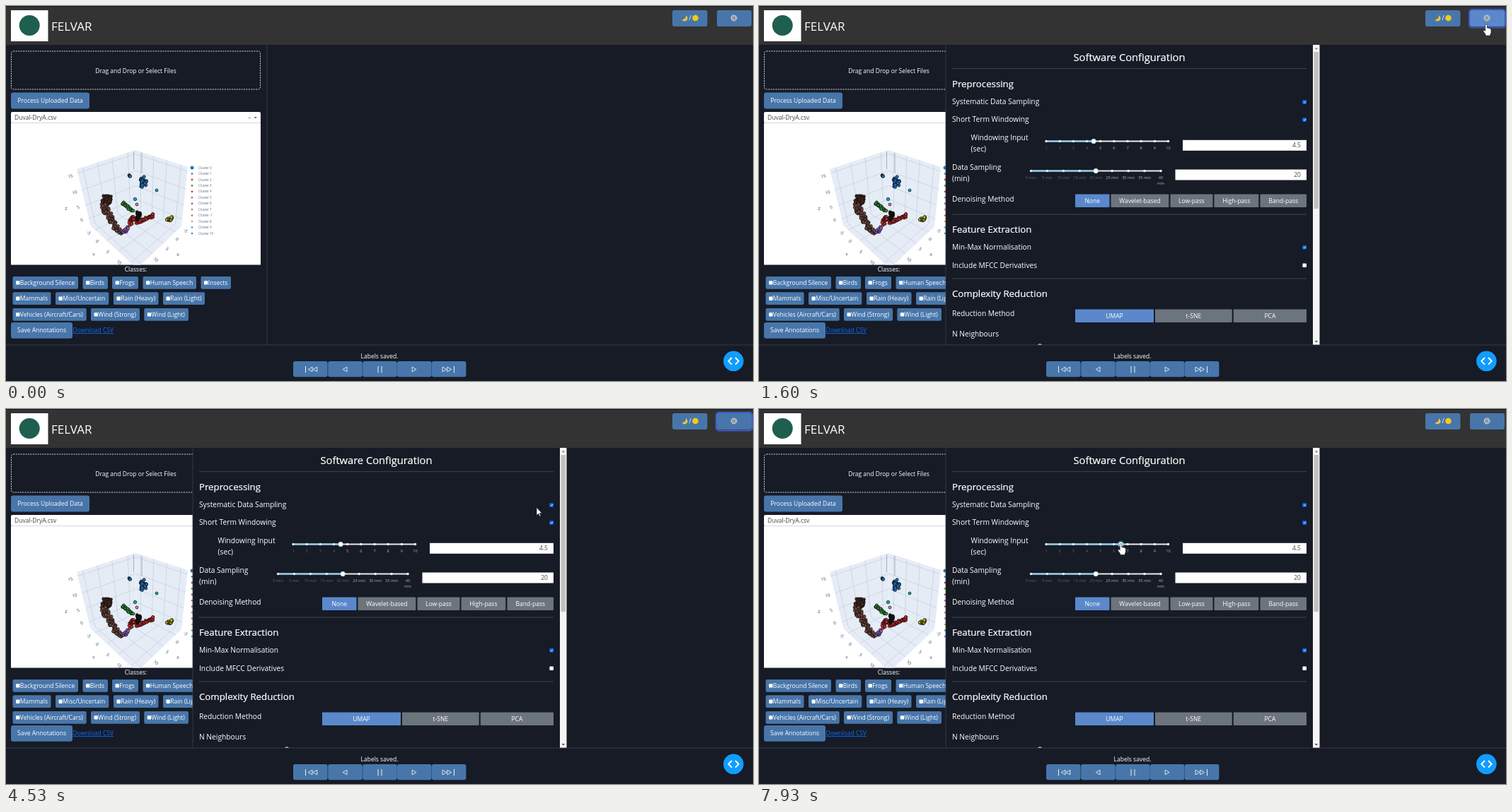
These frames come from a looping animation (1056 by 531 pixels, 8 s). An HTML page:

```html
<!DOCTYPE html>
<html lang="en">
<head>
<meta charset="utf-8">
<title>Annotation tool</title>
<style>
html, body { margin: 0; width: 100%; height: 100%; overflow: hidden; background: #161b26; }
svg { display: block; width: 100vw; height: 100vh; font-family: "Open Sans", "Noto Sans", sans-serif; }
text { white-space: pre; }
.head { stroke: #fff; stroke-width: .22; }
</style>
</head>
<body>
<svg id="stage" viewBox="0 0 1056 531"></svg>
<script>
const BG = '#161b26', BTN = '#4876aa', LIT = '#5a88cb', GREY = '#6c757d', LINE = '#3a3f49';
const BASE = 8.53, LABEL = 10.24, HEAD = 13.25;
const stage = document.getElementById('stage');

let seed = 7;
const rnd = () => (seed = seed * 16807 % 2147483647) / 2147483647;
const mix = (a, b, t) => a + (b - a) * t;

// Shape helpers; text is placed by the middle of its capitals.
const text = (x, cy, s, size = BASE, anchor = 'start', fill = '#fff', more = '') =>
  `<text x="${x}" y="${(cy + size * .357).toFixed(2)}" font-size="${size}" text-anchor="${anchor}" fill="${fill}" ${more}>${s}</text>`;
const rect = (x, y, w, h, fill, r = 0, more = '') =>
  `<rect x="${x}" y="${y}" width="${w}" height="${h}" rx="${r}" fill="${fill}" ${more}/>`;
const circle = (x, y, r, fill, more = '') =>
  `<circle cx="${x.toFixed(2)}" cy="${y.toFixed(2)}" r="${r}" fill="${fill}" ${more}/>`;
const path = (d, stroke, w = 1, fill = 'none') =>
  `<path d="${d}" stroke="${stroke}" stroke-width="${w}" fill="${fill}"/>`;
const button = (x0, x1, y, h, label, fill = BTN, r = 3) =>
  rect(x0, y, x1 - x0, h, fill, r) + text((x0 + x1) / 2, y + h / 2, label, BASE, 'middle');

function header() {
  return rect(0, 0, 1056, 1, '#101a2b') + rect(0, 1, 1056, 54, '#333') +
    rect(7, 6, 52.5, 44, '#fff') + circle(33.2, 27.5, 14.5, '#1f5f50') +
    text(64, 28.5, 'FELVAR', 17) +
    rect(942, 6, 49.5, 23, BTN, 3) +
    path('M961 13.2A4.3 4.3 0 1 1 955.6 19.4A5.2 5.2 0 0 0 961 13.2Z', 'none', 0, '#f3c53a') +
    text(967, 17.3, '/', BASE, 'middle') + circle(974.5, 17, 4.3, '#f4cb16') +
    `<rect id="ring" x="1004" y="5" width="51" height="25.5" rx="4" fill="none" stroke="#3f5ed2" stroke-width="2"/>` +
    `<rect id="gear" x="1005" y="6" width="49" height="23" rx="3"/>` +
    circle(1029, 17, 3.9, '#54606e', 'stroke="#d9dde2" stroke-width="1.1" stroke-dasharray="1.9 .55"') +
    circle(1029, 17, 2.7, 'none', 'stroke="#e3e6ea" stroke-width=".9"') +
    circle(1029, 17, 1.1, '#e3e6ea');
}

function scatter() {
  const dot = (x, y, c, r = 2.1) => circle(x, y, r, c, 'stroke="#111" stroke-width=".75"');
  // Points strewn along a polyline
  const trail = (pts, n, spread, c, r) => {
    let s = '';
    for (let i = 0; i < n; i++) {
      const u = (i + rnd()) / n * (pts.length - 1), k = Math.min(pts.length - 2, Math.floor(u));
      const [a, b] = [pts[k], pts[k + 1]];
      s += dot(mix(a[0], b[0], u - k) + (rnd() - .5) * 2 * spread, mix(a[1], b[1], u - k) + (rnd() - .5) * 2 * spread, c, r);
    }
    return s;
  };
  const top = [183, 204], left = [100, 231], right = [257, 228];
  const mid = [184, 283], lowL = [119.5, 311], lowR = [248, 312], front = [185, 372];
  const at = (a, b, t) => `${mix(a[0], b[0], t)} ${mix(a[1], b[1], t)}`;
  const face = (...p) => `<path d="M${p.map(q => q.join(' ')).join('L')}Z" fill="#e5ecf6"/>`;
  const rule = (a, b, c, d, t) => path(`M${at(a, b, t)}L${at(c, d, t)}`, '#bcc8d6', .6);
  let s = face(left, top, mid, lowL) + face(top, right, lowR, mid) + face(lowL, mid, lowR, front);
  for (const t of [.07, .37, .64, .88]) s += rule(left, lowL, top, mid, t) + rule(top, mid, right, lowR, t);
  for (const t of [.1, .35, .6, .87]) {
    s += rule(left, top, lowL, mid, t) + rule(top, right, mid, lowR, t);
    s += rule(lowL, front, mid, lowR, t) + rule(lowL, mid, front, lowR, t);
  }
  s += path('M180.5 206V231M192 208V236', '#7d8896', .6);
  const tick = (x, y, v, turn) => text(x, y, v, 6, 'middle', '#2a3f5f', `transform="rotate(${turn} ${x} ${y})"`);
  [['15', 91, 241], ['10', 97, 264], ['5', 102, 285], ['0', 107, 303]].forEach(([v, x, y]) => s += tick(x, y, v, -18));
  [['-5', 117, 321], ['0', 129, 333], ['5', 144, 348], ['10', 160, 363]].forEach(([v, x, y]) => s += tick(x, y, v, 42));
  [['10', 212, 359], ['5', 228, 344], ['0', 242, 330], ['-5', 254, 318]].forEach(([v, x, y]) => s += tick(x, y, v, 42));
  s += tick(85, 287, 'Z', 0) + tick(124, 352, 'Y', 0) + tick(243, 352, 'X', 0);

  s += trail([[173.5, 240], [175.5, 241]], 4, .8, '#1f77b4') +
    trail([[193.5, 245], [195, 253]], 40, 4, '#1f6fc0') +
    dot(213, 261, '#17a6c4', 2) + dot(182.5, 273.5, '#17a6c4', 2.2) + dot(185, 281, '#c98a96', 2) +
    trail([[137, 272], [147, 271], [139, 279], [147, 275]], 60, 3.2, '#4a2b22') +
    trail([[139, 283], [142, 292], [148, 300], [152, 310], [160, 321]], 110, 4, '#7a4a3e') +
    trail([[164.5, 279], [171, 284], [181, 291]], 24, 1.7, '#2a9a35') +
    trail([[163, 320], [168, 318], [172, 314]], 12, 2, '#9060c0') +
    trail([[175, 308], [180, 299], [184, 306], [191, 304]], 40, 2.6, '#d62728') +
    trail([[188, 304], [200, 301], [209, 296]], 30, 1.8, '#d62728') +
    trail([[188, 292], [187, 301]], 26, 2.6, '#111') +
    trail([[226, 303], [231, 302], [236, 300]], 18, 1.8, '#c9b820');

  const tones = ['#1f77b4', '#3366cc', '#d62728', '#2ca02c', '#d62728', '#9467bd', '#8c564b', '#c97f9f', '#8a7f7f', '#c9a820', '#17a6cf', '#2f8fd0'];
  const ids = [0, 1, 2, 3, 4, 5, 6, 7, -1, 8, 9, 10];
  ids.forEach((id, i) => {
    const y = 229 + i * 8.45;
    s += circle(263, y, i ? 1.3 : 2.5, tones[i]) + text(272, y, 'Cluster ' + id, 4.5, 'start', '#5a6a84');
  });
  return `<clipPath id="plot"><rect x="7" y="166" width="353" height="200.5"/></clipPath>` +
    rect(7, 165, 353, 201.5, '#fff') + `<g clip-path="url(#plot)">${s}</g>`;
}

function sidebar() {
  let s = rect(7.5, 64, 352, 54, 'none', 3, 'stroke="#fff" stroke-width=".8" stroke-dasharray="2.1 1.3"') +
    text(183.5, 91.5, 'Drag and Drop or Select Files', BASE, 'middle') +
    button(7, 118, 122.5, 23, 'Process Uploaded Data') + scatter() +
    rect(7, 150, 353, 15.5, '#fff', 2) + path('M7 165.6H360', '#c4c4c4', .7) +
    text(12, 158, 'Duval-DryA.csv', BASE, 'start', '#444') +
    text(344.5, 158, '×', 7.5, 'middle', '#888') + path('M350.2 157H355L352.6 159.6Z', 'none', 0, '#777') +
    text(183.5, 372.8, 'Classes:', BASE, 'middle');
  const chips = [
    [383, ['Background Silence', 9.5, 102], ['Birds', 108.5, 144], ['Frogs', 150, 187], ['Human Speech', 193.5, 269], ['Insects', 275.5, 318]],
    [405.3, ['Mammals', 9.5, 63.5], ['Misc/Uncertain', 70, 145.3], ['Rain (Heavy)', 152, 215.5], ['Rain (Light)', 222, 281]],
    [428, ['Vehicles (Aircraft/Cars)', 9.5, 113.7], ['Wind (Strong)', 120, 189], ['Wind (Light)', 195.3, 258]]
  ];
  for (const [y, ...row] of chips) for (const [name, a, b] of row)
    s += rect(a, y, b - a, 17.8, BTN, 2) + rect(a + 4.5, y + 6.2, 5.4, 5.4, '#fff', .8) + text(a + 10.3, y + 8.8, name);
  return s + button(7, 94, 448, 22.7, 'Save Annotations') +
    text(94.5, 459.2, 'Download CSV', BASE, 'start', '#0d6efd', 'text-decoration="underline"') +
    path('M369 55V480', LINE, .8);
}

function footer() {
  let s = rect(0, 480, 1056, 51, BG) + path('M0 480H1056', LINE, .9) +
    text(528, 495.8, 'Labels saved.', BASE, 'middle');
  [406, 455.2, 504.2, 553, 601.8].forEach(x => s += rect(x, 503, 48.6, 22.2, BTN, 3));
  const tri = (x, dir) => path(`M${x} 511.2V517.8L${x + 5.8 * dir} 514.5Z`, '#fff', .8);
  const bar = x => path(`M${x} 510V519.4`, '#fff', .9);
  return s + bar(423.5) + tri(433, -1) + tri(439.8, -1) + tri(482, -1) + bar(526) + bar(531) +
    tri(574.2, 1) + tri(617, 1) + tri(623.8, 1) + bar(633.5) +
    circle(1028.4, 502.8, 14.3, '#119dff') +
    path('M1026 498L1021.3 502.8L1026 507.6M1031 498L1035.7 502.8L1031 507.6', '#fff', 1.9);
}

// One slider: rail, filled part, stops, captions and handle
function slider(x0, x1, y, x, stops, on, caps, active) {
  const gap = (x1 - x0) / (stops - 1);
  let s = rect(x0, y - 1, x1 - x0, 2, '#e9e9e9', 1) + rect(x0, y - 1, x - x0, 2, '#8fd0ee', 1);
  for (let i = 0; i < stops; i++) {
    const cx = x0 + i * gap, past = cx <= x + .1;
    s += circle(cx, y, 1.7, past ? '#d9f1fc' : '#fff');
    if (caps) caps(i).split('|').forEach((c, n) =>
      s += text(cx, y + 9.5 + n * 8, c, 5.6, 'middle', past ? '#62666e' : '#b0b4ba'));
  }
  if (active) s += circle(x, y, 5, '#57c5f7', 'opacity=".35"');
  return s + circle(x, y, 3.2, '#fff', `stroke="${active ? '#57c5f7' : '#abe2fb'}" stroke-width="1"`);
}

const X0 = 406, GAP = 19.17;
const windowing = (v, active) =>
  slider(X0, X0 + 9 * GAP, 191.5, X0 + (v - 1) * GAP, 10, v, i => '' + (i + 1), active);

function panel() {
  const check = (y, on) => rect(768.4, y - 2.8, 5.6, 5.6, on ? '#0d6efd' : '#fff', 1) +
    (on ? path(`M769.7 ${y}L770.9 ${y + 1.2}L773 ${y - 1.2}`, '#fff', .8) : '');
  const head = (y, s) => text(273, y, s, HEAD, 'start', '#fff', 'class="head"');
  const label = (x, y, s) => text(x, y, s, LABEL);
  const field = (x, y, v) => rect(x, y, 774 - x, 15, '#fff') + text(766, y + 7.4, v, BASE, 'end', '#4a4a4a');
  const group = (y, list) => list.map(([s, a, b], i) => button(a, b, y, 18.4, s, i ? GREY : LIT, 1)).join('');
  const rule = y => path(`M273 ${y}H774`, '#494e57', .8);
  return rect(264, 55, 528.5, 425, BG) + path('M264 55V480', LINE, .8) +
    text(523.5, 72.3, 'Software Configuration', 14.7, 'middle', '#fff', 'class="head"') + rule(88.7) +
    head(110.3, 'Preprocessing') +
    label(273, 135.2, 'Systematic Data Sampling') + check(136, true) +
    label(273, 160.8, 'Short Term Windowing') + check(161, true) +
    label(299.5, 186, 'Windowing Input') + label(299.5, 202.5, '(sec)') +
    '<g id="drag"></g>' + field(599, 189.8, '4.5') +
    label(273, 228, 'Data Sampling') + label(273, 244.3, '(min)') +
    slider(384.5, 568, 233.5, 476.2, 9, 20, i => i < 8 ? i * 5 + ' min' : '40|min') + field(588.5, 231.5, '20') +
    label(273, 273, 'Denoising Method') +
    group(266.6, [['None', 447, 495.5], ['Wavelet-based', 497.5, 579.3], ['Low-pass', 581.5, 641.5], ['High-pass', 643.5, 706.3], ['Band-pass', 708.5, 774]]) +
    rule(295) + head(316.3, 'Feature Extraction') +
    label(273, 341.5, 'Min-Max Normalisation') + check(341.8, true) +
    label(273, 367, 'Include MFCC Derivatives') + check(367.2, false) + rule(386) +
    head(407.3, 'Complexity Reduction') + label(273, 435.5, 'Reduction Method') +
    group(429.6, [['UMAP', 447, 558], ['t-SNE', 560, 668.7], ['PCA', 670.8, 774]]) +
    label(273, 464, 'N Neighbours') + slider(292, 763, 481.9, 397, 10, 3) +
    rect(783, 55, 9.5, 425, '#f4f4f4') + rect(784.5, 65, 6.5, 222, '#c1c1c1') +
    path('M785.8 61.3H790L787.9 58.8Z', 'none', 0, '#777') + path('M785.8 474H790L787.9 476.5Z', 'none', 0, '#444');
}

const ARROW = 'M0 0V11L2.6 8.7L4.4 12.6L6 11.9L4.3 8.1H7.6Z';
const HAND = 'M-1.3 1.2Q-1.3 0 0 0T1.3 1.2V5.2Q2.5 4.6 3.5 5.6Q4.8 5 5.5 6.2Q7 6 7 7.8V11Q7 13 5.8 14V16H-.8V14.5L-3.8 10.2Q-4.6 8.6 -3.2 8.2Q-2.2 8.2 -1.3 9.4Z';

stage.innerHTML = sidebar() + `<g id="panel">${panel()}</g>` + header() + footer() +
  '<path id="cursor" fill="#fff" stroke="#111" stroke-width=".6"/>';
const [ring, gear, pane, drag, cursor] = ['ring', 'gear', 'panel', 'drag', 'cursor'].map(id => document.getElementById(id));

// Pointer route: [tick, x, y]
const ROUTE = [
  [1, 930, 516], [5, 985, 330], [9, 1047, 130], [13, 1036, 41], [20, 1028, 26], [33, 1028, 26],
  [38, 850, 62], [43, 520, 90], [46, 425, 93], [47, 414, 93.5], [49, 414, 93.5], [55, 560, 125],
  [62, 713, 146], [65, 744, 137], [68, 751, 142], [71, 640, 165], [74, 470, 178], [76, 470, 178],
  [82, 361, 188], [85, 385, 188], [89, 438, 186], [94, 473, 187.5], [101, 473, 187.5],
  [114, 504, 191], [119, 512, 190.5], [120, 512, 190.5]
];

// Monotone cubic through the route, so rests stay still
function along(k, c) {
  const slope = i => ROUTE[i + 1] && ROUTE[i] ? (ROUTE[i + 1][c] - ROUTE[i][c]) / (ROUTE[i + 1][0] - ROUTE[i][0]) : 0;
  const tangent = i => {
    const a = slope(i - 1), b = slope(i);
    return a * b > 0 ? 2 * a * b / (a + b) : 0;
  };
  let i = 0;
  while (i < ROUTE.length - 2 && k >= ROUTE[i + 1][0]) i++;
  const [p, q] = [ROUTE[i], ROUTE[i + 1]], h = q[0] - p[0], u = (k - p[0]) / h;
  return p[c] * (1 + 2 * u) * (1 - u) ** 2 + q[c] * u * u * (3 - 2 * u) +
    h * u * (1 - u) * (tangent(i) * (1 - u) - tangent(i + 1) * u);
}

const TICK = 200 / 3;
let shown = -1;
function draw(now) {
  const k = Math.floor((now % 8000 + 1) / TICK) % 120;
  if (k !== shown) {
    shown = k;
    const x = along(Math.max(k, 1), 1), y = along(Math.max(k, 1), 2);
    const over = k > 0 && x > 1005 && y < 29;
    cursor.style.display = k ? '' : 'none';
    cursor.setAttribute('d', over || k >= 87 ? HAND : ARROW);
    cursor.setAttribute('transform', `translate(${x.toFixed(2)} ${y.toFixed(2)})`);
    gear.setAttribute('fill', over ? LIT : BTN);
    ring.setAttribute('opacity', k < 24 || k > 103 ? 0 : k === 24 ? .85 : k === 103 ? .4 : 1);
    pane.style.display = k < 24 ? 'none' : '';
    const held = k >= 102;
    drag.innerHTML = windowing(held ? Math.round(((x - X0) / GAP + 1) * 2) / 2 : 4.5, held);
  }
  requestAnimationFrame(() => draw(performance.now()));
}
draw(performance.now());
</script>
</body>
</html>
```
